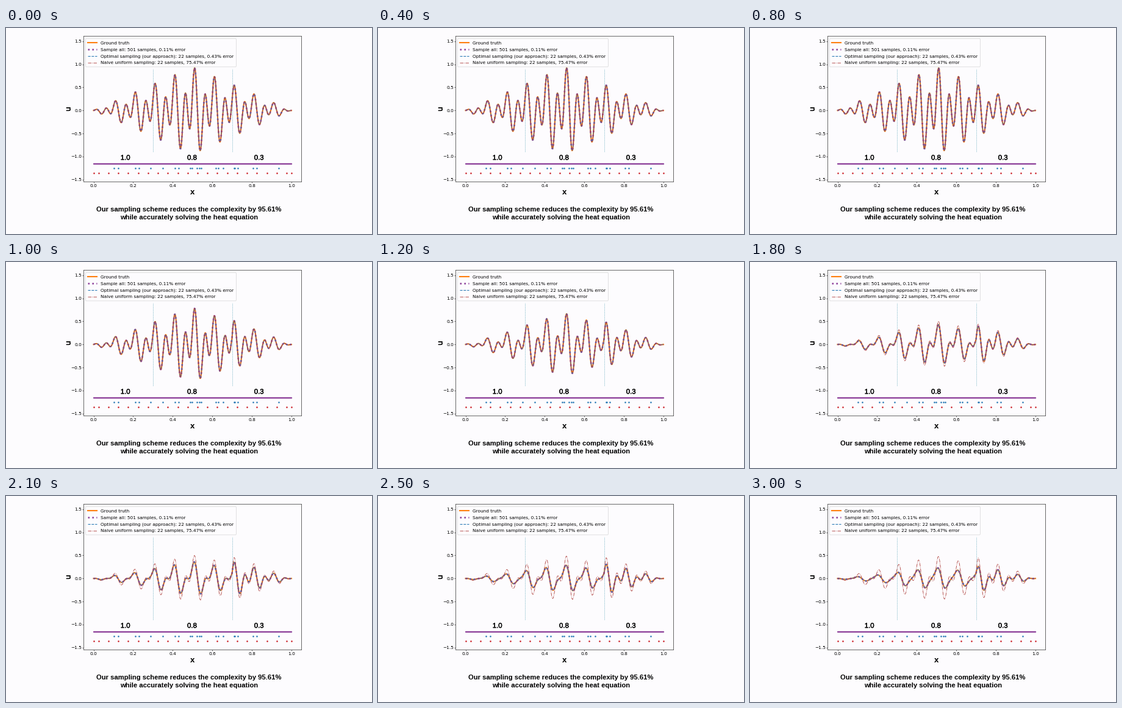
Recreate the animation shown at these times as a matplotlib script. Size 600 by 338 pixels, loop 3100 ms.

```python
import numpy as np
import matplotlib.pyplot as plt
from matplotlib.animation import FuncAnimation
from matplotlib.patches import FancyBboxPatch
from matplotlib.patheffects import withStroke

W, H, DPI = 600, 338, 100
FRAMES, INTERVAL = 31, 100
HOLD = 8              # frames before diffusion starts
RATE = 8.96e-6        # diffusion time per frame
LEFT, RIGHT, TOP, BOTTOM = 127.3, 484.2, 13.4, 252.2
PAPER = "#fdfcfe"
ORANGE, PURPLE, BLUE, RED = "#ff7f0e", "#8f449c", "#2a7ab5", "#cc2229"

plt.rcParams["font.family"] = "DejaVu Sans"


def px(size):
    """Pixels to points."""
    return size * 72 / DPI


# Heat equation with piecewise diffusivity
x = np.linspace(0, 1, 501)
dx = x[1]
mid = (x[1:] + x[:-1]) / 2
cond = np.where(mid < 0.3, 1.0, np.where(mid < 0.7, 0.8, 0.3))


def frame_step(substeps=20):
    """Crank-Nicolson propagator over one frame, zero at both ends."""
    lap = -np.diag(cond[:-1] + cond[1:])
    lap += np.diag(cond[1:-1], 1) + np.diag(cond[1:-1], -1)
    half = lap * RATE / dx**2 / (2 * substeps)
    eye = np.eye(len(lap))
    return np.linalg.matrix_power(np.linalg.solve(eye - half, eye + half), substeps)


def solve():
    envelope = 1 - np.abs(2 * x - 1)
    u = envelope * (0.383 * np.cos(20 * np.pi * x) + 0.665 * np.sin(40 * np.pi * x))
    step = frame_step()
    states = [u]
    for _ in range(FRAMES - HOLD):
        u = u.copy()
        u[1:-1] = step @ u[1:-1]
        states.append(u)
    return states


states = solve()


def exact(t):
    i = min(int(t), len(states) - 2)
    return states[i] + (t - i) * (states[i + 1] - states[i])


def naive(t):
    """The uniform sampling follows at first, then stalls and drifts off."""
    late = max(0, t - 7)
    if late == 0:
        return exact(t)
    stalled = exact(7 + 2.5 * (1 - np.exp(-late / 5)))
    return stalled * (1 + min(1, late / 6) * (0.06 + 0.3 * (2 * x - 1) ** 2))


# Stage and plot axes
fig = plt.figure(figsize=(W / 100, H / 100), dpi=DPI, facecolor=PAPER)
ax = fig.add_axes([LEFT / W, 1 - BOTTOM / H, (RIGHT - LEFT) / W, (BOTTOM - TOP) / H],
                  facecolor=PAPER)
ax.set_xlim(-0.05, 1.05)
ax.set_ylim(-1.545, 1.611)
ax.set_xticks(np.arange(0, 1.1, 0.2))
ax.set_yticks(np.arange(-1.5, 1.6, 0.5))
ax.xaxis.set_major_formatter("{x:.1f}")
ax.yaxis.set_major_formatter(lambda v, _: f"{v:.1f}".replace("-", "\u2212"))
ax.tick_params(labelsize=px(7.4), length=px(2.2), width=px(0.8), color="#444444",
               labelcolor="black")
ax.tick_params(axis="x", pad=px(1.6))
ax.tick_params(axis="y", pad=px(1.2))
for spine in ax.spines.values():
    spine.set_linewidth(px(0.8))
    spine.set_color("#444444")

stage = fig.add_axes([0, 0, 1, 1], facecolor="none")
stage.set_xlim(0, W)
stage.set_ylim(H, 0)
stage.axis("off")


def label(tx, ty, text, size, **kw):
    kw = {"ha": "center", "va": "baseline", "color": "black", **kw}
    return stage.text(tx, ty, text, fontsize=px(size), **kw)


def heavy(text):
    text.set_path_effects([withStroke(linewidth=px(0.35), foreground="black")])


heavy(label(305.7, 269.3, "x", 12, va="center"))
heavy(label(102, 133.2, "u", 12, va="center", rotation=90))
for cx, value in ((195.7, "1.0"), (305, "0.8"), (414.7, "0.3")):
    heavy(label(cx, 216.2, value, 11.4, family="Liberation Sans"))
for base, text in ((300.8, "Our sampling scheme reduces the complexity by 95.61%"),
                   (314.3, "while accurately solving the heat equation")):
    label(300, base, text, 11.2, family="Liberation Sans", weight="bold")

# Region borders and sample positions
for border in (0.3, 0.7):
    ax.plot([border] * 2, [-0.9, 0.9], color="#86bccb", lw=px(0.7), ls=(0, (2.6, 1.2)))
stage.plot([143.5, 468], [222.6] * 2, color=PURPLE, lw=px(2.4), solid_capstyle="round")
optimal = [177, 184, 212, 218, 237, 257, 277, 283, 302, 305.3, 313, 317, 320,
           344, 348, 356, 373.5, 375, 380, 405, 411, 446.5]
uniform = 143.7 + 324.4 * np.r_[0, np.arange(0.025, 1, 0.05), 1]
for spots, row, color in ((optimal, 230.3, BLUE), (uniform, 237.9, RED)):
    stage.plot(spots, np.full(len(spots), row), ls="none", marker="o", ms=px(2.6),
               mew=0, color=color)

# Curves and legend
styles = [
    ("Ground truth", dict(color=ORANGE, lw=px(2.1), ls="-")),
    ("Sample all: 501 samples, 0.11% error", dict(color=PURPLE, lw=px(2.6), ls=":")),
    ("Optimal sampling (our approach): 22 samples, 0.43% error",
     dict(color=BLUE, lw=px(1.1), ls="--")),
    ("Naive uniform sampling: 22 samples, 75.47% error",
     dict(color="#ae3f3c", lw=px(0.85), ls="-.")),
]
curves = [ax.plot(x, states[0], **style)[0] for _, style in styles]

stage.add_patch(FancyBboxPatch((130.4, 17.3), 247, 46.5,
                               boxstyle="round,pad=0,rounding_size=1.5",
                               fc=PAPER, ec="#dadada", lw=px(0.8)))
for row, (text, style) in enumerate(styles):
    y = 24.3 + 10.8 * row
    stage.plot([134, 149], [y, y], **style)
    label(155, y + 2.7, text, 7.43, ha="left")


def update(frame):
    t = max(0, frame - HOLD)
    for curve in curves[:3]:
        curve.set_ydata(exact(t))
    curves[3].set_ydata(naive(t))
    return curves


anim = FuncAnimation(fig, update, frames=FRAMES, interval=INTERVAL, repeat=True,
                     repeat_delay=0, blit=False)
plt.show()
```
